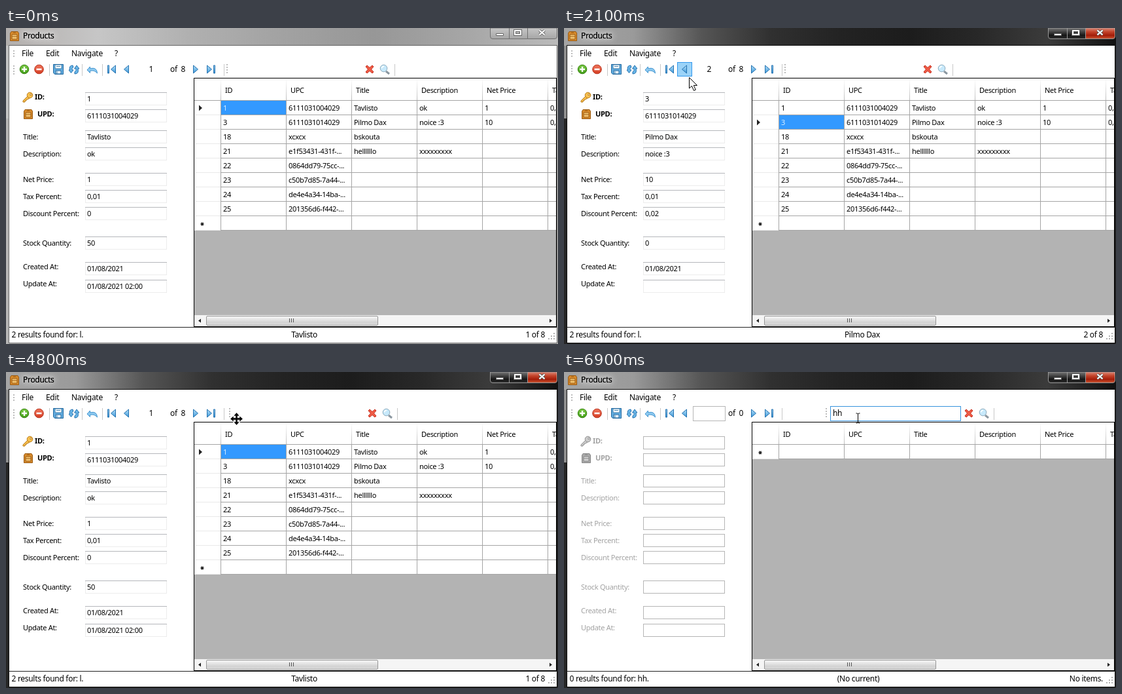
Write an HTML page with a canvas that moves like this. It is 844 by 482 pixels and loops after 7.2 s.

```html
<!DOCTYPE html>
<html lang="en">
<head>
<meta charset="utf-8">
<title>Products</title>
<style>
  html, body { margin: 0; width: 100%; height: 100%; overflow: hidden; background: #fff; }
  canvas { display: block; width: 844px; height: 482px; }
</style>
</head>
<body>
<canvas id="stage" width="844" height="482"></canvas>
<script>
const ctx = document.getElementById('stage').getContext('2d');
const LOOP = 7200, STEP = 100;
const FONT = '"Noto Sans", "Open Sans", sans-serif';

const products = [
  ['1', '6111031004029', 'Tavlisto', 'ok', '1', '0,01', '0', '50', '01/08/2021', '01/08/2021 02:00'],
  ['3', '6111031014029', 'Pilmo Dax', 'noice :3', '10', '0,01', '0,02', '0', '01/08/2021', ''],
  ['18', 'xcxcx', 'bskouta'],
  ['21', 'e1f53431-431f-...', 'hellllllo', 'xxxxxxxxx'],
  ['22', '0864dd79-75cc-...'],
  ['23', 'c50b7d85-7a44-...'],
  ['24', 'de4e4a34-14ba-...'],
  ['25', '201356d6-f442-...']
];
const newRow = [];
const headers = ['ID', 'UPC', 'Title', 'Description', 'Net Price', 'Tax Percent'];

// label, label baseline, value baseline
const fields = [
  ['ID:', 109, 112], ['UPD:', 135, 138], ['Title:', 170, 170], ['Description:', 196, 196],
  ['Net Price:', 235, 235], ['Tax Percent:', 261, 261], ['Discount Percent:', 287, 287],
  ['Stock Quantity:', 332, 332], ['Created At:', 368, 371], ['Update At:', 394, 398]
];

// time, position, shown row, highlighted row
const selection = [
  [0, 1, 0, 0], [800, 2, 1, 1], [1100, 2, 2, -1], [1200, 3, 2, 2], [2000, 2, 1, 1], [2200, 1, 0, 0]
];

// time, x, y of the pointer tip
const pointerPath = [
  [200, 520, 482], [500, 400, 230], [800, 296, 78], [1500, 296, 78], [1900, 191, 75], [2300, 191, 75],
  [2600, 110, 79], [3000, 26, 74], [3100, 22, 76], [3300, 4, 92], [3500, 290, 100], [3700, 528, 92],
  [3900, 536, 100], [4200, 470, 84], [4600, 348, 71], [4700, 348, 71], [4800, 352, 71],
  [5150, 393, 80], [5300, 411, 72], [5500, 449, 70]
];
const buttons = [[17, 39], [39, 61], [69, 91], [92, 114], [121, 143], [150, 172], [173, 195], [279, 301], [302, 324]];

const at = (table, t) => table.filter(row => row[0] <= t).pop();

function follow(path, t) {
  if (t < path[0][0]) return null;
  const i = path.findIndex(p => p[0] > t);
  if (i < 0) return path[path.length - 1].slice(1);
  const [t0, x0, y0] = path[i - 1], [t1, x1, y1] = path[i];
  const k = (t - t0) / (t1 - t0);
  return [x0 + (x1 - x0) * k, y0 + (y1 - y0) * k].map(Math.round);
}

function box(x, y, w, h, fill) { ctx.fillStyle = fill; ctx.fillRect(x, y, w, h); }
function frame(x, y, w, h, color) {
  ctx.strokeStyle = color; ctx.lineWidth = 1;
  ctx.strokeRect(x + .5, y + .5, w - 1, h - 1);
}
function gradient(x0, y0, x1, y1, ...colors) {
  const g = ctx.createLinearGradient(x0, y0, x1, y1);
  colors.forEach((c, i) => g.addColorStop(i / (colors.length - 1), c));
  return g;
}
function text(s, x, y, { size = 11, color = '#000', align = 'left', weight = 400 } = {}) {
  ctx.font = `${weight} ${size}px ${FONT}`;
  ctx.letterSpacing = '-0.3px';
  ctx.textAlign = align;
  ctx.fillStyle = color;
  ctx.fillText(s, x, y);
}
function shape(d, fill, stroke, width = 1, x = 0, y = 0) {
  const path = new Path2D(d);
  ctx.save();
  ctx.translate(x, y);
  if (fill) { ctx.fillStyle = fill; ctx.fill(path); }
  if (stroke) { ctx.strokeStyle = stroke; ctx.lineWidth = width; ctx.stroke(path); }
  ctx.restore();
}
function disc(x, y, r, fill, stroke) {
  ctx.beginPath();
  ctx.arc(x, y, r, 0, 7);
  ctx.fillStyle = fill; ctx.fill();
  ctx.strokeStyle = stroke; ctx.lineWidth = 1; ctx.stroke();
}
function grip(x, y, n) {
  for (let i = 0; i < n; i++) box(x, y + i * 4, 2, 2, '#bcbcbc');
}

function crate(x, y, gray) {
  const [edge, face, inner] = gray ? ['#858585', '#aaa', '#d4d4d4'] : ['#9a5a12', '#d68a2c', '#f5c673'];
  shape('M2 .5H12L13.5 3V14.5H.5V3Z', face, edge, 1, x, y);
  shape('M3 5H11V12H3Z', inner, edge, 1, x, y);
  shape('M3 8H11M5 2H9', null, edge, 1, x, y);
}
function key(x, y, gray) {
  const [fill, edge] = gray ? ['#ccc', '#8f8f8f'] : ['#f7c150', '#b97a18'];
  shape('M7 6L0 13V15H3V13H5V11H7L10 9Z', fill, edge, 1, x, y);
  disc(x + 10.5, y + 4.5, 4.3, fill, edge);
  disc(x + 12, y + 3.5, 1.2, '#fff', edge);
}

function titleBar(active) {
  const bar = active
    ? gradient(0, 0, 844, 0, '#a5a5a5', '#9a9a9a', '#555', '#303030', '#232323', '#1c1c1c', '#282828', '#3b3b3b', '#111')
    : gradient(0, 0, 844, 0, '#b2aeac', '#c6c6c6', '#b0b0b0', '#a2a2a2', '#979797', '#a6a6a6', '#bababa');
  box(0, 0, 844, 482, active ? '#252525' : '#b4b4b4');
  box(0, 0, 844, 27, bar);
  box(0, 27, 4, 111, active ? '#8d8d8d' : '#c2c2c2');
  ctx.save();
  ctx.shadowColor = '#fff'; ctx.shadowBlur = 10;
  for (let i = 0; i < 2; i++) text('Products', 26, 16, { size: 12 });
  ctx.restore();
  crate(6, 5);

  const caption = active ? gradient(0, 0, 0, 17, '#777', '#444', '#151515', '#333') : gradient(0, 0, 0, 17, '#c6c6c6', '#a5a5a5');
  const close = active ? gradient(0, 0, 0, 17, '#dc8a78', '#c4452c', '#a31c08', '#d3603a') : caption;
  const edge = active ? '#999' : '#6f6f6f';
  shape('M740.5 0V13Q740.5 16.5 744 16.5H797.5V0Z', caption, edge);
  shape('M797.5 0V16.5H839Q842.5 16.5 842.5 13V0Z', close, edge);
  shape('M769.5 0V16', null, edge);
  const ink = active ? '#555' : '#666';
  shape('M749.5 8.5H760.5V11.5H749.5Z', '#fff', ink);
  shape('M778 4H787V10H778Z', null, ink, 4);
  shape('M778 4H787V10H778Z', null, '#fff', 2);
  shape('M815.5 3.5L823.5 10.5M823.5 3.5L815.5 10.5', null, ink, 4);
  shape('M815.5 3.5L823.5 10.5M823.5 3.5L815.5 10.5', null, '#fff', 2.2);
  box(4, 26, 839, 455, active ? '#111' : '#666');
  box(5, 27, 837, 453, '#fff');
}

function toolbar(s) {
  [['File', 24], ['Edit', 61], ['Navigate', 100], ['?', 166]].forEach(([label, x]) => text(label, x, 43, { size: 12 }));
  grip(11, 34, 3);
  grip(11, 57, 4);
  [66, 116, 147, 328 + 5].forEach(x => box(x, 55, 1, 18, '#c8c8c8'));

  const hot = s.pointer && s.pointer[1] > 50 && s.pointer[1] < 80 && s.time < 3300 &&
    buttons.find(([a, b]) => s.pointer[0] >= a && s.pointer[0] <= b);
  if (hot) {
    box(hot[0], 52, hot[1] - hot[0] + 1, 22, '#9bd3f8');
    frame(hot[0], 52, hot[1] - hot[0] + 1, 22, '#3399ee');
  }

  disc(28, 63, 6.8, gradient(0, 56, 0, 70, '#7ccb45', '#3f9a16'), '#35820f');
  shape('M24 63H32M28 59V67', null, '#fff', 2.4);
  disc(50.5, 63, 6.8, gradient(0, 56, 0, 70, '#f0765c', '#d33c22'), '#b8311c');
  shape('M46.5 63H54.5', null, '#fff', 2.6);

  shape('M72.5 55.5H87.5V70.5H74.5L72.5 68.5Z', '#63ade0', '#22689f');
  shape('M75 56H85V62H75Z', '#fff', '#3c7caa');
  shape('M76 65H84V70H76Z', '#e6f2fa', '#22689f');
  shape('M77 58.5H83M78 66V70', null, '#4684ae');

  const blue = '#3f94d0', dark = '#2472b0';
  shape('M102 57Q96 57 97.5 64L96 64L99.5 68.5L103 64H101Q100 60 103 60Z', '#6ab7e8', dark);
  shape('M105 70Q112 70 110 62H112L108 57L104.5 62H107Q108 66 105 67Z', '#6ab7e8', dark);
  shape('M124 64L128.5 59V62Q139 59 139.5 69Q135 63.5 128.5 65.5V68.5Z', '#8fcaf0', blue);

  const arrow = gradient(0, 57, 0, 69, '#bfe4fa', '#409cdb');
  const left = 'M7 0V12L0 6Z', right = 'M0 0V12L7 6Z', bar = 'M0 0H2V12H0Z';
  [[bar, 155.5], [left, 160.5], [left, 180.5], [right, 286.5], [right, 307.5], [bar, 317.5]]
    .forEach(([d, x]) => {
      ctx.save();
      ctx.translate(x, 0);
      shape(d, gradient(0, 0, 0, 12, '#b5e0fa', '#3d98d8'), dark, 1, 0, 57);
      ctx.restore();
    });

  if (s.empty) frame(197, 52, 50, 23, '#b6b6b6');
  else text(s.position, 218.5, 67, { size: 12 });
  text('of  ' + s.total, 251, 67, { size: 12 });

  // search strip
  const dx = s.shift;
  grip(337 + dx, 55, 4);
  if (s.focused) {
    frame(407, 52, 200, 23, '#3793dd');
    text(s.query, 411, 67, { size: 12 });
    if (s.caret) box(411 + Math.round(ctx.measureText(s.query).width), 56, 1, 14, '#000');
  }
  shape('M-6 -4L-4 -6L0 -2.5L4 -6L6 -4L2.5 0L6 4L4 6L0 2.5L-4 6L-6 4L-2.5 0Z', '#ef5b46', '#c52c1b', 1, 556 + dx, 63);
  shape('M581 66L586 70', null, '#8b97a0', 3, dx, 0);
  disc(577.5 + dx, 61.5, 5.3, '#c7e9fb', '#8aa9bb');
  shape('M574.5 61.5Q575 58.5 578 58.5', null, '#fff', 1.5, dx, 0);
  box(594 + dx, 55, 1, 18, '#c8c8c8');
}

function details(s) {
  key(26, 98, s.empty);
  crate(27, 124, s.empty);
  const color = s.empty ? '#a3a3a3' : '#000';
  fields.forEach(([label, labelY, valueY], i) => {
    text(label, [44, 48][i] || 26, labelY, { color, weight: i < 2 ? 700 : 400 });
    const top = valueY - 14;
    if (s.empty) {
      frame(121, top, 125, 20, '#b5b5b5');
    } else {
      frame(121, top, 125, 20, '#ececec');
      box(121, top, 125, 1, '#b5b7bb');
      text(s.record[i] || '', 124, valueY);
    }
  });
}

function grid(s) {
  const line = '#a5a5a5', bottom = 111 + s.rows.length * 22;
  ctx.save();
  ctx.beginPath();
  ctx.rect(288, 77, 553, 378);
  ctx.clip();
  box(288, 77, 554, 361, '#b3b3b3');
  box(288, 77, 554, bottom - 77, '#fff');

  const [px, py] = s.pointer || [0, 0];
  const hot = py > 78 && py < 111 && px > 328 && s.time > 3300 && s.time < 4500 ? Math.floor((px - 329) / 100) : -1;
  if (hot >= 0) {
    box(429 + (hot - 1) * 100, 80, 99, 29, gradient(0, 80, 0, 109, '#e4fcff', '#b4effb'));
    frame(429 + (hot - 1) * 100, 80, 99, 29, '#b5e9f3');
  }
  headers.forEach((h, i) => {
    const x = 328 + i * 100;
    box(x, 78, 1, 32, gradient(0, 78, 0, 110, '#fff', '#bbb'));
    box(x, 110, 1, bottom - 110, line);
    text(h, x + 7, 99);
  });
  box(288, 110, 554, 1, line);

  s.rows.forEach((row, r) => {
    const top = 111 + r * 22;
    box(328, top + 21, 514, 1, line);
    box(290, top + 21, 38, 1, '#e9e9e9');
    if (r === s.highlight) box(329, top, 99, 21, '#3399ff');
    row.slice(0, 6).forEach((cell, c) => {
      text(cell, 332 + c * 100, top + 15, { color: r === s.highlight && c === 0 ? '#d9efff' : '#000' });
    });
  });
  if (s.marker >= 0) shape('M0 -4.5L5 0L0 4.5Z', '#222', null, 1, 295, 122 + s.marker * 22);
  shape('M-2.5 0H2.5M-1.5 -2.3L1.5 2.3M1.5 -2.3L-1.5 2.3', null, '#222', 1.3, 300, bottom - 10);

  // horizontal scroll bar
  box(288, 438, 554, 18, '#f5f5f5');
  shape('M306.5 441Q306.5 439.5 308 439.5H567Q568.5 439.5 568.5 441V452Q568.5 453.5 567 453.5H308Q306.5 453.5 306.5 452Z',
    gradient(0, 439, 0, 454, '#f7f7f7', '#e8e8e8', '#d2d2d2', '#dedede'), '#979797');
  [433, 436, 439].forEach(x => box(x, 443, 1, 6, '#555'));
  shape('M298 443.5V449.5L294 446.5Z', '#222');
  shape('M831 443.5V449.5L835 446.5Z', '#222');
  ctx.restore();
  frame(287, 76, 555, 380, '#000');
}

function statusBar(s) {
  box(5, 456, 837, 1, '#222');
  const size = 12;
  text(`${s.found} results found for: ${s.searched}.`, 8.5, 472, { size });
  text(s.empty ? '(No current)' : products[s.position - 1][2], s.empty ? 450 : 456, 472, { size, align: 'center' });
  text(s.empty ? 'No items.' : `${s.position} of ${s.total}`, 824, 472, { size, align: 'right' });
  for (let i = 0; i < 3; i++)
    for (let j = 0; j <= i; j++) box(837 - j * 4, 465 + i * 4, 2, 2, '#b2b2b2');
}

function pointer(s) {
  if (!s.pointer) return;
  const [x, y] = s.pointer;
  if (s.time >= 5400) {
    shape('M-3 -7.5H-1L0 -6.5L1 -7.5H3M0 -6.5V6.5M-3 7.5H-1L0 6.5L1 7.5H3', null, '#000', 1, x + .5, y + .5);
  } else if (s.time >= 4600) {
    const head = 'M0 -9L3.5 -5H1V-1H5V-3.5L9 0L5 3.5V1H1V5H3.5L0 9L-3.5 5H-1V1H-5V3.5L-9 0L-5 -3.5V-1H-1V-5H-3.5Z';
    shape(head, '#000', '#fff', 2.4, x + .5, y + .5);
    shape(head, '#000', '#000', .6, x + .5, y + .5);
  } else {
    shape('M0 0V16.5L4 13L7 20L9.8 18.8L6.8 12H12Z', '#fff', '#000', 1, x + .5, y + .5);
  }
}

function sceneAt(time) {
  const [, position, shown, highlight] = at(selection, time);
  const filtered = time >= 6000, empty = time >= 6400;
  let rows = [...products, newRow];
  if (filtered) rows = [products[0], products[3], time < 6100 ? ['', 'xcxcx', 'bskouta'] : newRow];
  if (empty) rows = [newRow];
  return {
    time, position, rows, empty,
    record: products[shown],
    highlight: empty ? -1 : highlight,
    marker: empty ? -1 : shown,
    total: empty ? 0 : time >= 6100 ? 2 : 8,
    found: empty ? 0 : 2,
    searched: empty ? 'hh' : time >= 6100 ? 'h' : 'l',
    query: time >= 6300 ? 'hh' : filtered ? 'h' : '',
    focused: time >= 5500,
    caret: time < 6900,
    shift: time < 4800 ? 0 : Math.round(4 + 59 * Math.min(1, (time - 4800) / 500)),
    pointer: follow(pointerPath, time)
  };
}

function draw(now) {
  const s = sceneAt(Math.floor((now % LOOP) / STEP) * STEP);
  titleBar(s.time >= 100);
  toolbar(s);
  details(s);
  grid(s);
  statusBar(s);
  pointer(s);
}

const start = performance.now();
function tick() {
  draw(performance.now() - start);
  requestAnimationFrame(tick);
}
tick();
</script>
</body>
</html>
```
